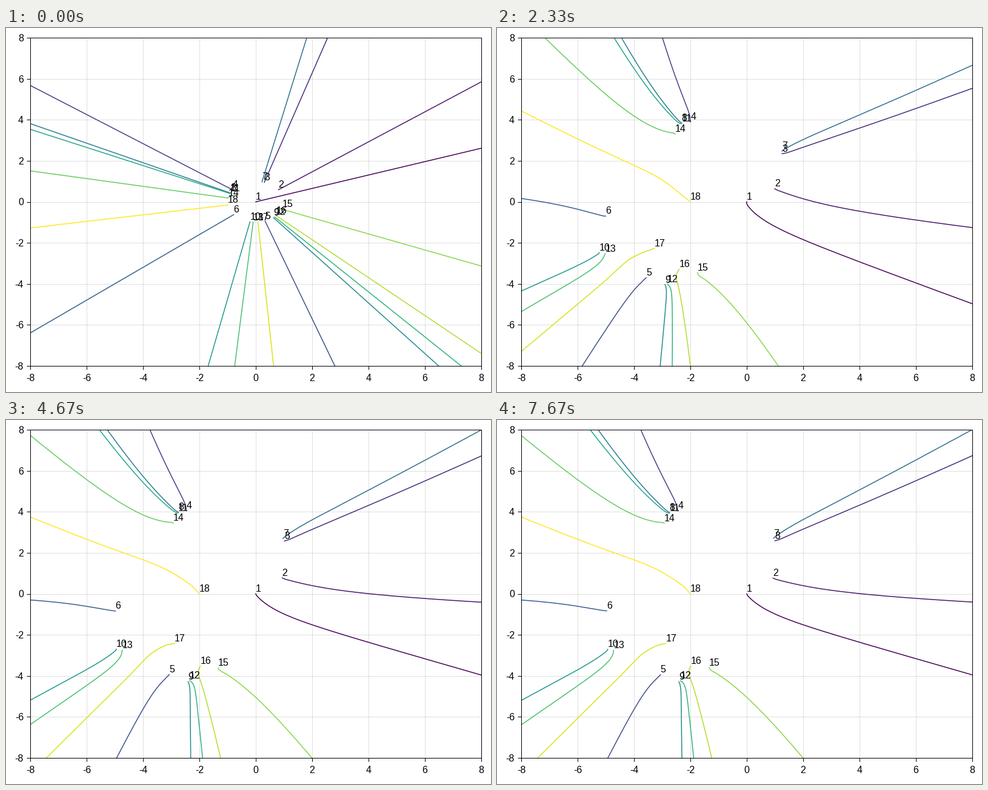
Write a matplotlib script that moves like this. It is 800 by 600 pixels and loops after 8000 ms.

```python
"""Spider algorithm for a periodic external angle of the quadratic family.

Each step pulls the legs back through P(z) = L (1 + z/2)^2, where L is the
foot of the second leg; the critical point is -2 and the critical value 0.
"""
import numpy as np
import matplotlib.pyplot as plt
from matplotlib.animation import FuncAnimation

plt.rcParams.update({"font.family": "Liberation Sans", "axes.unicode_minus": False})
W, H, DPI = 800, 600, 100
PX = 72 / DPI
LOOP, TICK = 8000, 50
STEPS = 24

PERIOD = 18
THETA = 0b000011001101101111 / (2 ** PERIOD - 1)
ANGLES = 2 * np.pi * (THETA * 2.0 ** np.arange(PERIOD) % 1)
FAR = 1e4


def first_spider():
    legs = [np.exp(1j * a) * np.geomspace(FAR, 1, 200) for a in ANGLES]
    legs[0] = np.exp(1j * ANGLES[0]) * np.append(np.geomspace(FAR, 1e-3, 300), 0)
    return legs


def root_along(curve):
    """Square root followed continuously from the far end to the foot."""
    phase = np.unwrap(np.angle(curve))
    return np.sqrt(np.abs(curve)) * np.exp(0.5j * phase)


def pull_back(legs):
    scale = legs[1][-1]
    roots = [root_along(leg / scale) for leg in legs[1:] + legs[:1]]
    # The first leg must end at 0, which fixes the turn of all legs at infinity.
    lead = roots[0] * np.sign(roots[0][-1].real)
    turn = np.angle(lead[0]) - ANGLES[0]
    result = []
    for angle, root in zip(ANGLES, roots):
        direction = np.exp(1j * (angle + turn))
        side = np.sign((root[0] / direction).real)
        leg = 2 * (side * root - 1)
        extension = leg[0] + direction * np.geomspace(FAR, 1, 24)
        result.append(np.concatenate([extension, leg]))
    return result


spiders = [first_spider()]
while len(spiders) < STEPS:
    spiders.append(pull_back(spiders[-1]))

fig = plt.figure(figsize=(W / DPI, H / DPI), dpi=DPI, facecolor="white")
ax = fig.add_axes([40 / W, 1 - 557 / H, 744 / W, 541 / H])
ax.set(xlim=(-8, 8), ylim=(-8, 8), xticks=range(-8, 9, 2), yticks=range(-8, 9, 2))
ax.set_axisbelow(True)
ax.grid(color="black", alpha=0.12, linewidth=PX)
ax.tick_params(length=6 * PX, width=PX, labelsize=16 * PX)
ax.tick_params(axis="x", pad=6.5 * PX)
ax.tick_params(axis="y", pad=5 * PX)
for spine in ax.spines.values():
    spine.set_linewidth(PX)

colors = plt.get_cmap("viridis")(np.linspace(0, 1, PERIOD))
lines = [ax.plot([], [], color=c, linewidth=1.5 * PX)[0] for c in colors]
labels = [ax.text(0, 0, str(i + 1), fontsize=16 * PX, ha="left", va="baseline", zorder=5)
          for i in range(PERIOD)]
LIFT = 3.5 * 16 / 541


def draw(tick):
    # The small lead keeps each change from landing after its due time.
    step = int(tick * TICK * STEPS / LOOP + 0.11)
    for line, label, leg in zip(lines, labels, spiders[step]):
        near = leg[np.abs(leg) < 100]
        line.set_data(near.real, near.imag)
        label.set_position((leg[-1].real, leg[-1].imag + LIFT))
    return lines + labels


anim = FuncAnimation(fig, draw, frames=LOOP // TICK, interval=TICK, repeat=True, repeat_delay=0)
plt.show()
```
